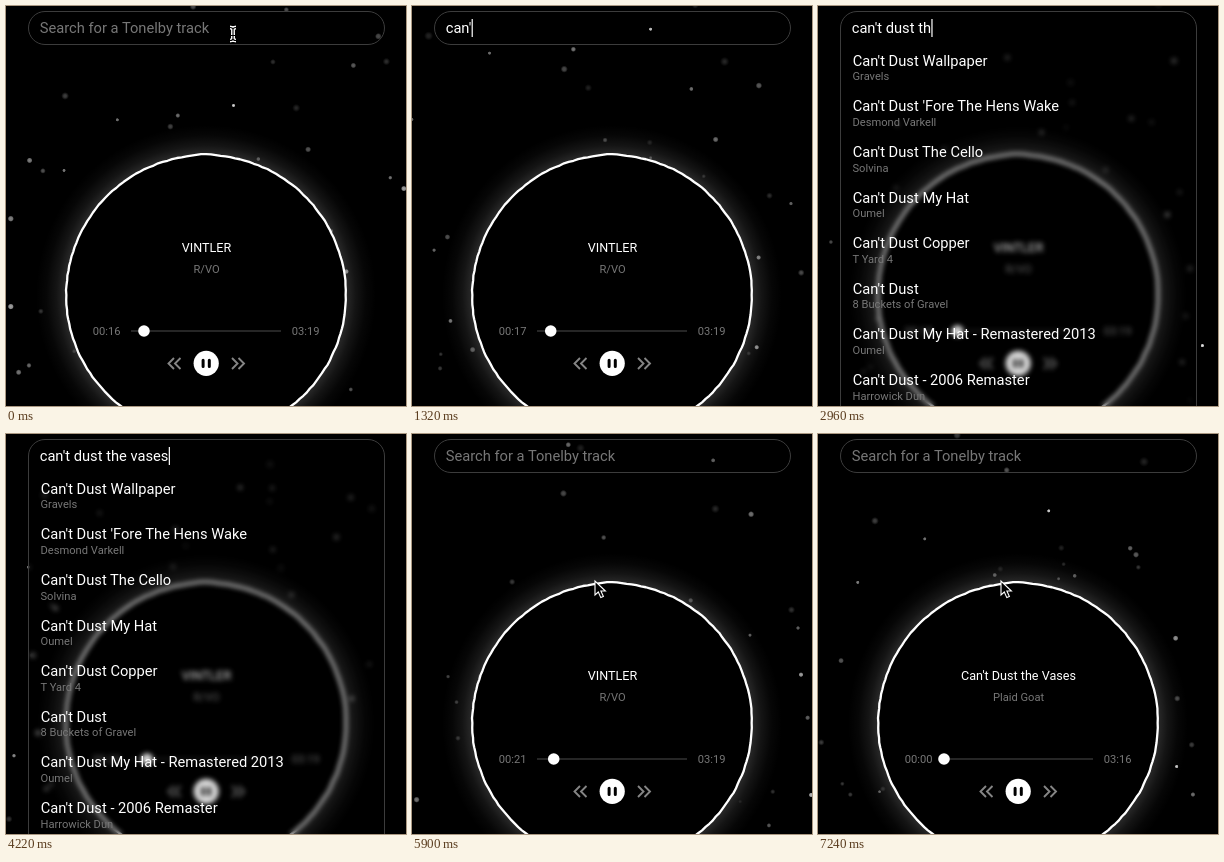
Animation, 400 px wide and 400 px high, one loop 7260 ms. Source, as an HTML page with a canvas:

```html
<!DOCTYPE html>
<html lang="en">
<head>
<meta charset="utf-8">
<title>Music player search</title>
<style>
  html, body { margin: 0; width: 100%; height: 100%; overflow: hidden; background: #000; }
  #stage { position: relative; width: 400px; height: 400px; overflow: hidden; background: #000; }
  canvas, svg, #panel { position: absolute; left: 0; top: 0; }
  #panel { left: 22px; top: 5px; width: 357px; height: 34px; box-sizing: border-box;
    border: 1px solid #3c3c3c; border-radius: 17px; }
  #panel.open { height: 430px; background: rgba(0, 0, 0, .15); backdrop-filter: blur(2.5px); }
  text { font-family: Roboto, sans-serif; font-size: 11.15px; fill: #777; white-space: pre; }
  .big { font-size: 14.7px; fill: #fff; }
  #title { font-size: 12.6px; fill: #fff; }
  .mid { text-anchor: middle; }
</style>
</head>
<body>
<div id="stage">
  <canvas id="sky" width="400" height="400"></canvas>
  <svg width="400" height="400">
    <defs>
      <radialGradient id="glow">
        <stop offset=".82" stop-color="#fff" stop-opacity=".17"/>
        <stop offset=".88" stop-color="#fff" stop-opacity=".08"/>
        <stop offset=".94" stop-color="#fff" stop-opacity=".025"/>
        <stop offset="1" stop-color="#fff" stop-opacity="0"/>
      </radialGradient>
    </defs>
    <circle cx="200" cy="289" r="170" fill="url(#glow)"/>
    <path id="ring" stroke="#fff" stroke-width="2.3" stroke-linejoin="round"/>
    <text id="title" class="mid" x="200.5" y="245.7"></text>
    <text id="artist" class="mid" x="200.5" y="267"></text>
    <text id="now" x="86.8" y="329"></text>
    <text id="total" x="285.8" y="329"></text>
    <path d="M125 325H275" stroke="#4c4c4c"/>
    <circle id="knob" cy="325" r="5.8" fill="#fff"/>
    <path d="M168 352l-5.5 5.5 5.5 5.5M174.5 352l-5.5 5.5 5.5 5.5M226 352l5.5 5.5-5.5 5.5M232.5 352l5.5 5.5-5.5 5.5"
      fill="none" stroke="#858585" stroke-width="1.9"/>
    <circle cx="200.2" cy="357.3" r="12.6" fill="#fff"/>
    <path d="M197.1 354.2v6.2M203.3 354.2v6.2" stroke="#000" stroke-width="3" stroke-linecap="round"/>
  </svg>
  <div id="panel"></div>
  <svg width="400" height="400">
    <text id="query" class="big" x="33.7" y="27"></text>
    <rect id="caret" y="13" width="1.2" height="18" fill="#fff"/>
    <g id="list"></g>
    <g id="beam" transform="translate(227 28)" fill="none">
      <path id="bar" d="M-3-6.5q3 0 3 2v9q0 2-3 2M3-6.5q-3 0-3 2M3 6.5q-3 0-3-2M-2 1.5h4" stroke="#fff" stroke-width="3.4"/>
      <use href="#bar" style="stroke-width: 1"/>
      <path d="M-3-6.5q3 0 3 2v9q0 2-3 2M3-6.5q-3 0-3 2M3 6.5q-3 0-3-2M-2 1.5h4" stroke="#000" stroke-width="1.1"/>
    </g>
    <path id="arrow" d="M0 0V14l3.3-3 2.5 5.6 2.6-1.1-2.5-5.5h4.5z" fill="#000" stroke="#fff" stroke-width="1.1"/>
  </svg>
</div>
<script>
const LOOP = 7260, PHRASE = "can't dust the vases";
const HINT = "Search for a Tonelby track";
const FOCUS = .55, OPEN = 2.6, REFRESH = 4.7, PICK = 5.5, SWITCH = 6.6;
const KEYS = [[.75, 0], [1.3, 4], [2.24, 10], [2.95, 13], [4.1, 20]];
const TRACKS = [
  ["Can't Dust Wallpaper", "Gravels"],
  ["Can't Dust 'Fore The Hens Wake", "Desmond Varkell"],
  ["Can't Dust The Cello", "Solvina"],
  ["Can't Dust My Hat", "Oumel"],
  ["Can't Dust Copper", "T Yard 4"],
  ["Can't Dust", "8 Buckets of Gravel"],
  ["Can't Dust My Hat - Remastered 2013", "Oumel"],
  ["Can't Dust - 2006 Remaster", "Harrowick Dun"]
];
const FIRST = { title: "VINTLER", artist: "R/VO", length: 199 };
const NEXT = { title: "Can't Dust the Vases", artist: "Plaid Goat", length: 196 };

const $ = id => document.getElementById(id);
const show = (id, on) => $(id).style.display = on ? "" : "none";
const label = (id, s) => { if ($(id).textContent !== s) $(id).textContent = s; };
const clock = s => [s / 60, s % 60].map(n => String(Math.floor(n)).padStart(2, "0")).join(":");
const rand = (i, k) => { const v = Math.sin(i * 127.1 + k * 311.7) * 43758.5453; return v - Math.floor(v); };
const ctx = $("sky").getContext("2d");

// Result rows
$("list").innerHTML = TRACKS.map(([name, by], i) => {
  const y = 59.8 + i * 45.6;
  return `<text class="big" x="34.7" y="${y}">${name}</text><text x="34.5" y="${y + 14.6}">${by}</text>`;
}).join("");
const rows = $("list").children;

// Slightly uneven ring with a small peak at the top
let outline = "";
for (let i = 0; i < 180; i++) {
  const a = i * Math.PI / 90, off = Math.min(a, 2 * Math.PI - a);
  const r = 139.9 + .6 * (rand(i, 9) - .5) + 1.1 * Math.exp(-((off / .07) ** 2));
  outline += (i ? "L" : "M") + (200 + r * Math.sin(a)).toFixed(2) + " " + (289 - r * Math.cos(a)).toFixed(2);
}
$("ring").setAttribute("d", outline + "Z");

function typedCount(t) {
  for (let i = KEYS.length - 1; i >= 0; i--) {
    const [at, n] = KEYS[i], next = KEYS[i + 1];
    if (t >= at) return next ? Math.floor(n + (next[1] - n) * (t - at) / (next[0] - at)) : n;
  }
  return 0;
}

function drawStars(t) {
  ctx.clearRect(0, 0, 400, 400);
  for (let i = 0; i < 52; i++) {
    const a = -Math.PI / 2 + (rand(i, 1) - .5) * 4.4;
    const d = (rand(i, 2) + t * (.16 + .14 * rand(i, 3))) % 1;
    const dist = 125 + 200 * d, x = 200 + dist * Math.cos(a), y = 289 + dist * Math.sin(a);
    const far = rand(i, 4) ** 2;
    const r = .9 + 1.5 * rand(i, 5) + 2.6 * far * d;
    const alpha = (1 - .85 * Math.sqrt(far)) * (.5 + .5 * rand(i, 6)) * Math.sin(Math.PI * d) ** .3;
    const g = ctx.createRadialGradient(x, y, 0, x, y, r + .7);
    g.addColorStop(0, `rgba(255,255,255,${alpha})`);
    g.addColorStop(.65 - .4 * far, `rgba(255,255,255,${alpha * .85})`);
    g.addColorStop(1, "rgba(255,255,255,0)");
    ctx.fillStyle = g;
    ctx.fillRect(x - r - 1, y - r - 1, 2 * r + 2, 2 * r + 2);
  }
}

function drawPlayer(t) {
  const track = t < SWITCH ? FIRST : NEXT;
  const time = Math.floor(t < SWITCH ? 16 + t : t - SWITCH);
  label("title", track.title);
  label("artist", track.artist);
  label("now", clock(time));
  label("total", clock(track.length));
  $("knob").setAttribute("cx", 126 + 149 * time / track.length);
}

function drawSearch(t) {
  const text = t < PICK ? PHRASE.slice(0, typedCount(t)) : "";
  const open = t >= OPEN && t < PICK;
  label("query", text || HINT);
  $("query").style.fill = text ? "#fff" : "#777";
  $("caret").setAttribute("x", 34 + (text ? $("query").getComputedTextLength() : 0));
  show("caret", t >= FOCUS && t < PICK);
  $("panel").className = open ? "open" : "";
  show("list", open);
  const [name, by] = t < REFRESH ? TRACKS[2] : [NEXT.title, NEXT.artist];
  rows[4].textContent = name;
  rows[5].textContent = by;
}

function drawPointer(t) {
  const p = Math.min(1, Math.max(0, (t - 4.8) / .55)), e = p * p * (3 - 2 * p);
  show("beam", t < KEYS[0][0]);
  show("arrow", t >= 4.8);
  $("arrow").setAttribute("transform", `translate(${227 - 44 * e} ${28 + 119 * e})`);
}

const start = performance.now();
function frame() {
  const t = (performance.now() - start) % LOOP / 1000;
  drawStars(t);
  drawPlayer(t);
  drawSearch(t);
  drawPointer(t);
  requestAnimationFrame(frame);
}
frame();
</script>
</body>
</html>
```
